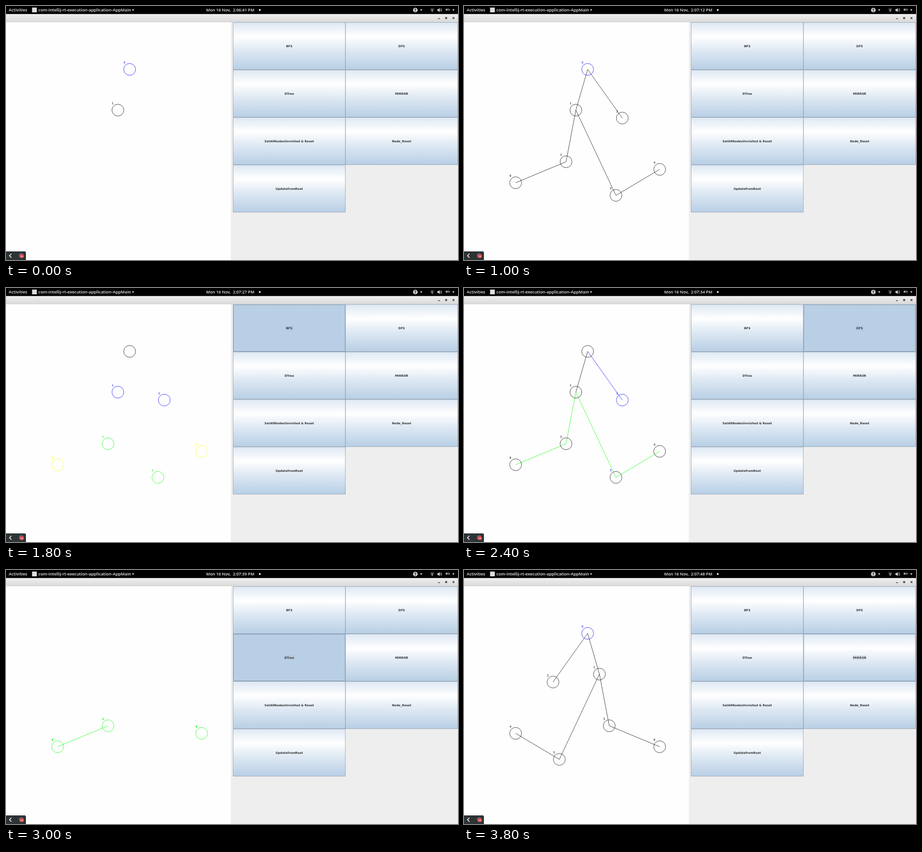
These frames come from a looping animation (998x561 px, 4 s). An HTML page:

```html
<!DOCTYPE html>
<html lang="en">
<head>
<meta charset="utf-8">
<title>Tree traversal</title>
<style>
  html, body { margin: 0; width: 100%; height: 100%; overflow: hidden; background: #eee; }
  svg { display: block; width: 998px; height: 561px; }
  .bar { font: 600 9.35px "Open Sans", Cantarell, sans-serif; fill: #eee; }
  .button { font: bold 6.45px "DejaVu Sans", sans-serif; fill: #333; text-anchor: middle; }
  .tree { font: 6.4px "DejaVu Sans", sans-serif; stroke-width: .75; }
</style>
</head>
<body>
<svg viewBox="0 0 998 561" xmlns="http://www.w3.org/2000/svg">
  <defs>
    <linearGradient id="ocean" x2="0" y2="1">
      <stop stop-color="#dde8f3"/><stop offset=".3" stop-color="#fff"/>
      <stop offset=".6" stop-color="#dde8f3"/><stop offset="1" stop-color="#b8cfe5"/>
    </linearGradient>
    <linearGradient id="titlebar" x2="0" y2="1">
      <stop stop-color="#efefef"/><stop offset="1" stop-color="#d9d9d9"/>
    </linearGradient>
  </defs>
  <rect width="998" height="561" fill="#eee"/>
  <rect y="36" width="496.5" height="525" fill="#fefefe"/>
  <rect y="17.5" width="998" height="18.5" fill="url(#titlebar)"/>
  <rect width="998" height="17.7"/>

  <g class="bar">
    <text x="6" y="12.4">Activities</text>
    <rect x="57.5" y="3.5" width="10.5" height="10.5" fill="#ddd"/>
    <text x="71.5" y="12.4">com-intellij-rt-execution-application-AppMain</text>
    <text id="clock" x="442" y="12.4" font-size="9.1" style="font-size:9.1px"></text>
    <circle cx="560.3" cy="8.8" r="2.1"/>
    <path d="M278 7.5h5l-2.5 3.2zM914.3 7.5h5l-2.5 3.2zM985.3 7.5h5l-2.5 3.2z"/>
  </g>

  <g fill="none" stroke="#ddd">
    <circle cx="903.8" cy="9" r="5" fill="#ddd" stroke="none"/>
    <path d="M901 7.7h5.6M903.8 7.7v2.6M903.8 10l-1.7 2.8M903.8 10l1.7 2.8" stroke="#111" stroke-width=".9"/>
    <circle cx="903.8" cy="5.9" r=".9" fill="#111" stroke="none"/>
    <path d="M936.8 7q4.2-3.6 8.4 0" stroke="#777"/>
    <path d="M938.4 9.2q2.6-2 5.2 0M941 10v3.2" stroke-width="1.5"/>
    <path d="M952.5 7.2h2l3-2.7v9l-3-2.7h-2z" fill="#ddd" stroke="none"/>
    <path d="M959 6.7q1.6 2.3 0 4.6M960.7 5.2q2.8 3.8 0 7.6" stroke-width=".9"/>
    <rect x="971.3" y="6.3" width="6.4" height="3.6" stroke="#888"/>
    <path d="M971 8.1h4M978.6 7v2.2" stroke-width="1.6"/>
  </g>

  <g fill="none" stroke="#222" stroke-width="1.3">
    <path d="M953.8 27.8h4.4M986 24.6l4 4M990 24.6l-4 4"/>
    <rect x="970.5" y="25.3" width="2.6" height="2.6"/>
  </g>

  <g id="buttons" class="button"></g>
  <g id="tree" class="tree"></g>

  <path d="M0 542h41q3 0 3 3v16H0z" fill="#2e3436"/>
  <path d="M12 547.3l-4.3 4.3 4.3 4.3" fill="none" stroke="#fff" stroke-width="1.6"/>
  <circle cx="34" cy="551.4" r="5.2" fill="#4a80b8"/>
  <circle cx="35" cy="552.3" r="4.5" fill="#e8352e"/>
  <text x="35" y="554.5" font-family="DejaVu Sans, sans-serif" font-size="5.6" fill="#fff" text-anchor="middle">26</text>
</svg>
<script>
const STEP = 200, LOOP = 4000;
const BLACK = '#000', BLUE = '#00f', GREEN = '#0f0', YELLOW = '#ff0';
const byId = id => document.getElementById(id);

const labels = ['BFS', 'DFS', 'DTree', 'MIRROR', 'SetAllNodesUnvisited &amp; Reset', 'Node_Reset', 'UpdatefromRoot'];
const focusWidths = [14, 15, 23, 29];
const nodes = [[273, 140], [247, 230], [349.5, 247.5], [225.3, 344], [432, 360.8], [335.5, 418.3], [114, 390.4]];
const edges = [[0, 1], [0, 2], [1, 3], [1, 5], [3, 6], [5, 4]];

// Seconds past 2:06:00 shown by the clock at each step.
const seconds = [41, 47, 53, 59, 66, 72, 76, 81, 85, 87, 90, 92, 94, 97, 98, 99, 101, 102, 103, 108];

const node = (i, color, label = i, labelColor = color, weight = 'normal', mirrored = false) => {
  const [x0, y] = nodes[i], x = mirrored ? 546 - x0 : x0;
  return `<circle cx="${x}" cy="${y}" r="13.1" fill="none" stroke="${color}"/>` +
    `<text x="${x - 13.4}" y="${y - 13}" fill="${labelColor}" font-weight="${weight}">${label}</text>`;
};

const edge = ([a, b], color, mirrored = false) => {
  const [p, q] = [a, b].map(i => (mirrored ? 546 - nodes[i][0] : nodes[i][0]) + ' ' + nodes[i][1]);
  return `<path d="M${p}L${q}" stroke="${color}"/>`;
};

const plainTree = (nodeCount, edgeCount, mirrored) =>
  edges.slice(0, edgeCount).map(e => edge(e, BLACK, mirrored)).join('') +
  nodes.slice(0, nodeCount).map((_, i) => node(i, i ? BLACK : BLUE, i, undefined, 'normal', mirrored)).join('');

function breadthFirst(count) {
  const levelColors = [BLACK, BLUE, BLUE, GREEN, YELLOW, GREEN, YELLOW];
  return [0, 1, 2, 3, 5, 4, 6].slice(0, count).map(i => node(i, levelColors[i], i || '')).join('');
}

function depthFirst(count) {
  const seen = [0, 1, 3, 6, 5, 4, 2].slice(0, count);
  const edgeColors = [BLACK, BLUE];
  return edges.map((e, k) => seen.includes(e[1]) ? edge(e, edgeColors[k] || GREEN) : '').join('') +
    seen.map(i => node(i, i === 2 ? BLUE : BLACK, i || '', i === 5 ? BLUE : undefined)).join('');
}

function deleteTree(count) {
  const seen = [6, 3, 4, 5, 1, 2, 0].slice(0, count);
  const marks = ['', 'D', 'O', '3', '8', '5', count > 1 ? '8' : '0'];
  return edges.map((e, k) => k !== 1 && seen.includes(e[0]) ? edge(e, GREEN) : '').join('') +
    seen.map(i => node(i, GREEN, `<tspan style="font-size:5.9px">${marks[i]}</tspan>`, GREEN, i === 2 ? 'normal' : 'bold')).join('');
}

function treeAt(step) {
  if (step < 7) return plainTree([2, 4, 7][step] || 7, [0, 0, 0, 2, 4][step] ?? 6);
  if (step < 10) return breadthFirst([2, 6, 7][step - 7]);
  if (step < 13) return depthFirst([3, 5, 7][step - 10]);
  if (step < 19) return deleteTree([1, 2, 3, 5, 6, 7][step - 13]);
  return plainTree(7, 6, true);
}

function buttonsAt(step) {
  const active = step < 7 ? -1 : step < 10 ? 0 : step < 13 ? 1 : step < 19 ? 2 : 3;
  return labels.map((label, i) => {
    const x = 501.6 + i % 2 * 248.1, y = 36.3 + Math.floor(i / 2) * 104.9;
    const isActive = i === active, pressed = isActive && i < 3, w = focusWidths[i];
    const box = (inset, fill, stroke) => `<rect x="${x + inset}" y="${y + inset}" width="${247.6 - 2 * inset}" ` +
      `height="${104.2 - 2 * inset}" fill="${fill}" stroke="${stroke}" stroke-width=".8"/>`;
    return box(0, pressed ? '#b8cfe5' : 'url(#ocean)', '#8697a8') +
      (isActive ? box(.9, 'none', pressed ? '#8fa5bc' : '#9fb6cf') +
        `<rect x="${x + 123.8 - w / 2}" y="${y + 48.4}" width="${w}" height="8" fill="none" stroke="#a0b5ca" stroke-width=".6"/>` : '') +
      `<text x="${x + 123.8}" y="${y + 54.7}">${label}</text>`;
  }).join('');
}

function clockAt(step) {
  const s = seconds[step], pad = n => String(n).padStart(2, '0');
  return `Mon 16 Nov,\u00a0 2:${pad(6 + Math.floor(s / 60))}:${pad(s % 60)} PM`;
}

let shown = -1;
function draw(time) {
  const step = Math.floor(time % LOOP / STEP);
  if (step === shown) return;
  shown = step;
  byId('tree').innerHTML = treeAt(step);
  byId('buttons').innerHTML = buttonsAt(step);
  byId('clock').textContent = clockAt(step);
}

const start = performance.now();
function tick() {
  draw(performance.now() - start);
  requestAnimationFrame(tick);
}
tick();
</script>
</body>
</html>
```
